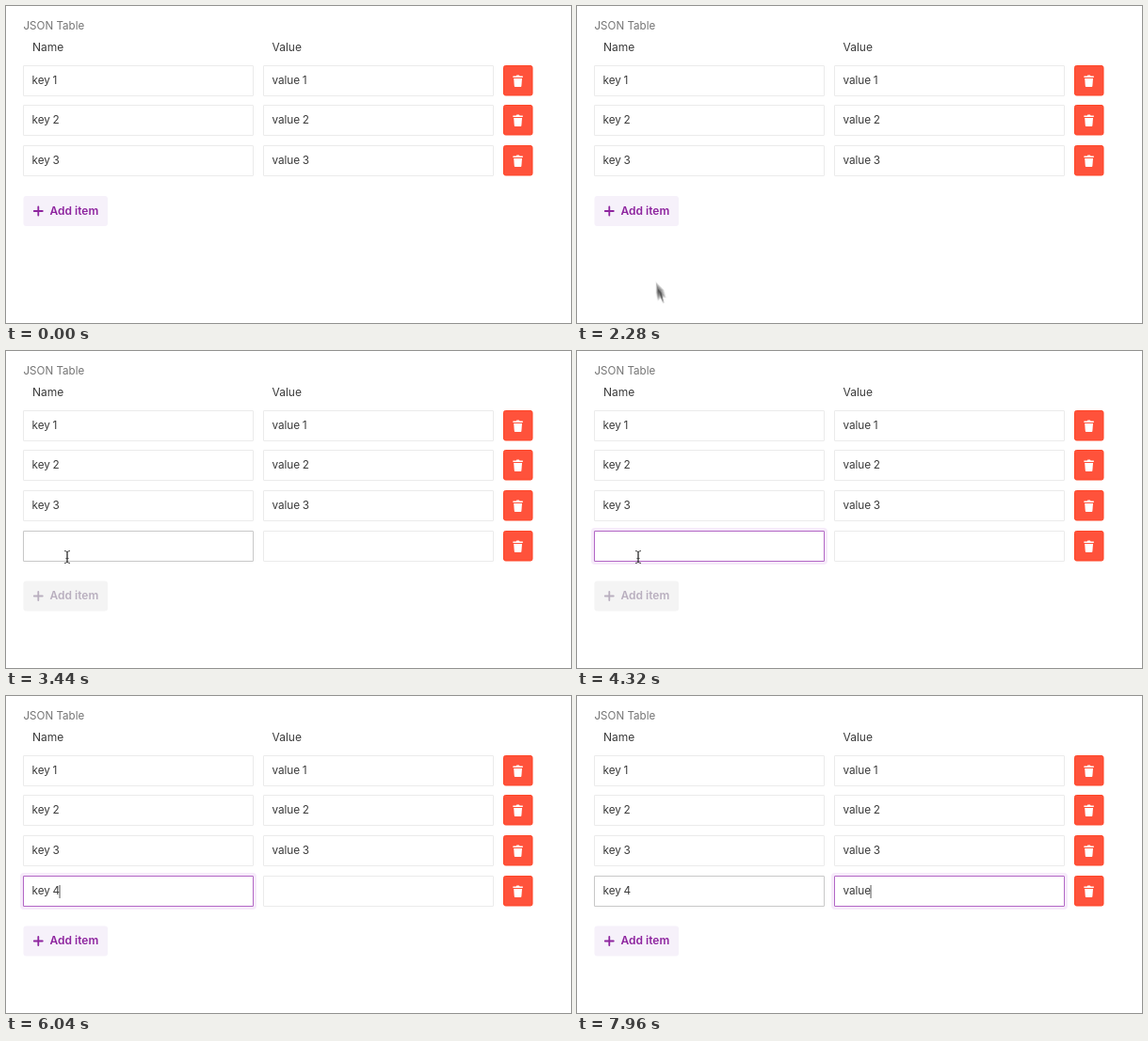
These frames come from a looping animation (600 px wide and 337 px high, 8000 ms). An HTML page:

```html
<!DOCTYPE html>
<html lang="en">
<head>
<meta charset="utf-8">
<title>JSON table</title>
<style>
  html, body { margin: 0; width: 100%; height: 100%; overflow: hidden; background: #fff; }
  svg { display: block; width: 600px; height: 337px; }
  text { font: 400 12px Inter, Roboto, sans-serif; fill: #3a3a3a; white-space: pre; }
  .title { font-size: 11.6px; fill: #747474; }
  #rows text { font-size: 11.8px; letter-spacing: -.08px; word-spacing: -.5px; }
  .box { fill: #fff; stroke: #ebebeb; }
  .bin { fill: #ff523b; stroke: #ff4526; }
  .focus { fill: none; stroke: #b266c5; }
  .glow { fill: none; stroke: #f6eafa; stroke-width: 3; }
  .hover { fill: none; stroke: #c8c8c8; }
  #add { fill: #8e259f; stroke: #8e259f; }
  #add rect { fill: #f6f1fa; stroke: none; }
  #add text { fill: inherit; stroke: none; font-weight: 600; }
  #add.hot rect { fill: #efe4f5; }
  #add.off { fill: #b9afbf; stroke: #b9afbf; }
  #add.off rect { fill: #f4f4f4; }
</style>
</head>
<body>
<svg viewBox="0 0 600 337">
  <defs>
    <g id="trash" fill="#fff">
      <path d="M-5.2-5.2h3.2l.8-1h2.4l.8 1h3.2v1.5h-10.4z"/>
      <path d="M-4.4-2.7h8.8l-.6 7.8q-.1 1.2-1.3 1.2h-5q-1.2 0-1.3-1.2z"/>
    </g>
    <path id="arrow" d="M0 0v15l3.4-3.2 2.3 5.4 2.6-1.1-2.3-5.2h4.7z" fill="#111" stroke="#fff"/>
  </defs>
  <text class="title" x="18.5" y="25">JSON Table</text>
  <text x="28" y="47.5">Name</text>
  <text x="282.5" y="47.5">Value</text>
  <g id="rows"></g>
  <g id="add">
    <rect x="18.5" y="202" width="89.5" height="32" rx="3"/>
    <path d="M34.3 213.5v9M29.8 218h9" stroke-width="1.8" stroke-linecap="round"/>
    <text x="46.5" y="221.5">Add item</text>
  </g>
  <path id="caret" stroke="#555"/>
  <g id="ghosts"></g>
  <path id="hand" d="M-1.5-1q1.5-1.6 3 0v6l5 1.2q2 .6 1.7 2.6l-1 5.2h-7.5l-4.4-6q-.7-2 1.2-1.6l2 1.6z"
        fill="#fff" stroke="#111" stroke-linejoin="round"/>
  <path id="beam" d="M62 212.5q3 0 3 2v9q0 2-3 2M68 212.5q-3 0-3 2v9q0 2 3 2M63.5 220.5h3" fill="none" stroke="#444"/>
</svg>
<script>
const LOOP = 8000, ENTER = 2165, HOVER = 2520, ARRIVE = 2705, ADD = 2960, CLICK = 3800, TAB = 6600;
const FIELDS = [
  { x: 18.5, text: 'key 4', keys: [4720, 4900, 5080, 5480, 5760], from: CLICK, to: TAB },
  { x: 273.5, text: 'value', keys: [7080, 7240, 7400, 7600, 7800], from: TAB, to: LOOP }
];
const GHOSTS = 12, GHOST_STEP = 1.8;
const $ = id => document.getElementById(id);
const clamp = v => Math.max(0, Math.min(1, v));
const show = (el, on) => el.style.opacity = +on;

const box = (x, y, cls, grow = 0) =>
  `<rect class="${cls}" x="${x - grow}" y="${y - grow}" width="${244 + 2 * grow}" height="${32 + 2 * grow}" rx="${.5 + grow}"/>`;

function row(i) {
  const y = 63.5 + Math.floor(42.8 * i), last = i === 3;
  const cells = FIELDS.map(({ x, text }, n) => {
    const label = last ? '' : `${['key', 'value'][n]} ${i + 1}`;
    return (last ? box(x, y, 'glow', 2) : '') + box(x, y, 'box') +
      (last ? box(x, y, 'hover') + box(x, y, 'focus') : '') +
      `<text x="${x + 9}" y="${y + 19.5}">${label}</text>`;
  });
  return `<g>${cells.map(c => `<g>${c}</g>`).join('')}
    <rect class="bin" x="528.5" y="${y}" width="30.5" height="31.5" rx="2"/>
    <use href="#trash" x="543.6" y="${y + 16.3}"/></g>`;
}

$('rows').innerHTML = [0, 1, 2, 3].map(row).join('');
$('ghosts').innerHTML = '<use href="#arrow" opacity=".09"/>'.repeat(GHOSTS);
const newRow = $('rows').lastElementChild;
FIELDS.forEach((f, i) => {
  const cell = newRow.children[i];
  for (const cls of ['glow', 'hover', 'focus']) f[cls] = cell.querySelector('.' + cls);
  f.label = cell.querySelector('text');
});

function pointerAt(t) {
  const p = 1 - (1 - clamp((t - ENTER) / (ARRIVE - ENTER))) ** 2;
  return [101 - 36 * p, 352 - 136 * p];
}

function drawPointer(t) {
  const [x, y] = pointerAt(t);
  show($('ghosts'), t >= ENTER && t < HOVER);
  [...$('ghosts').children].forEach((ghost, i) => {
    const [gx, gy] = pointerAt(t - i * GHOST_STEP);
    ghost.setAttribute('transform', `translate(${gx - 4} ${gy - 8})`);
  });
  show($('hand'), t >= HOVER && t < ADD);
  $('hand').setAttribute('transform', `translate(${x} ${y})`);
  show($('beam'), t >= ADD && t < FIELDS[0].keys[0]);
}

function drawField(f, t, hovered) {
  const typed = f.keys.filter(k => k <= t);
  const fade = ms => clamp((t - f.from) / ms) * (1 - clamp((t - f.to) / ms));
  f.label.textContent = f.text.slice(0, typed.length);
  f.focus.style.opacity = fade(200);
  f.glow.style.opacity = fade(80);
  show(f.hover, hovered);
  if (t < f.from || t >= f.to) return;
  const x = f.x + 9 + (typed.length ? f.label.getComputedTextLength() : 0);
  const since = t - (typed.at(-1) ?? f.from);
  $('caret').setAttribute('d', `M${x} 201v14`);
  show($('caret'), since % 1000 < 500);
}

function draw(t) {
  const added = t >= ADD, hot = t >= HOVER && !added;
  const empty = added && t < FIELDS[0].keys[0];
  show(newRow, added);
  show($('caret'), false);
  FIELDS.forEach((f, i) => drawField(f, t, added && i === 0));
  $('add').setAttribute('transform', `translate(0 ${added ? 42.5 : 0})`);
  $('add').setAttribute('class', empty ? 'off' : hot ? 'hot' : '');
  drawPointer(t);
}

const start = performance.now();
function tick() {
  draw((performance.now() - start) % LOOP);
  requestAnimationFrame(tick);
}
tick();
</script>
</body>
</html>
```
